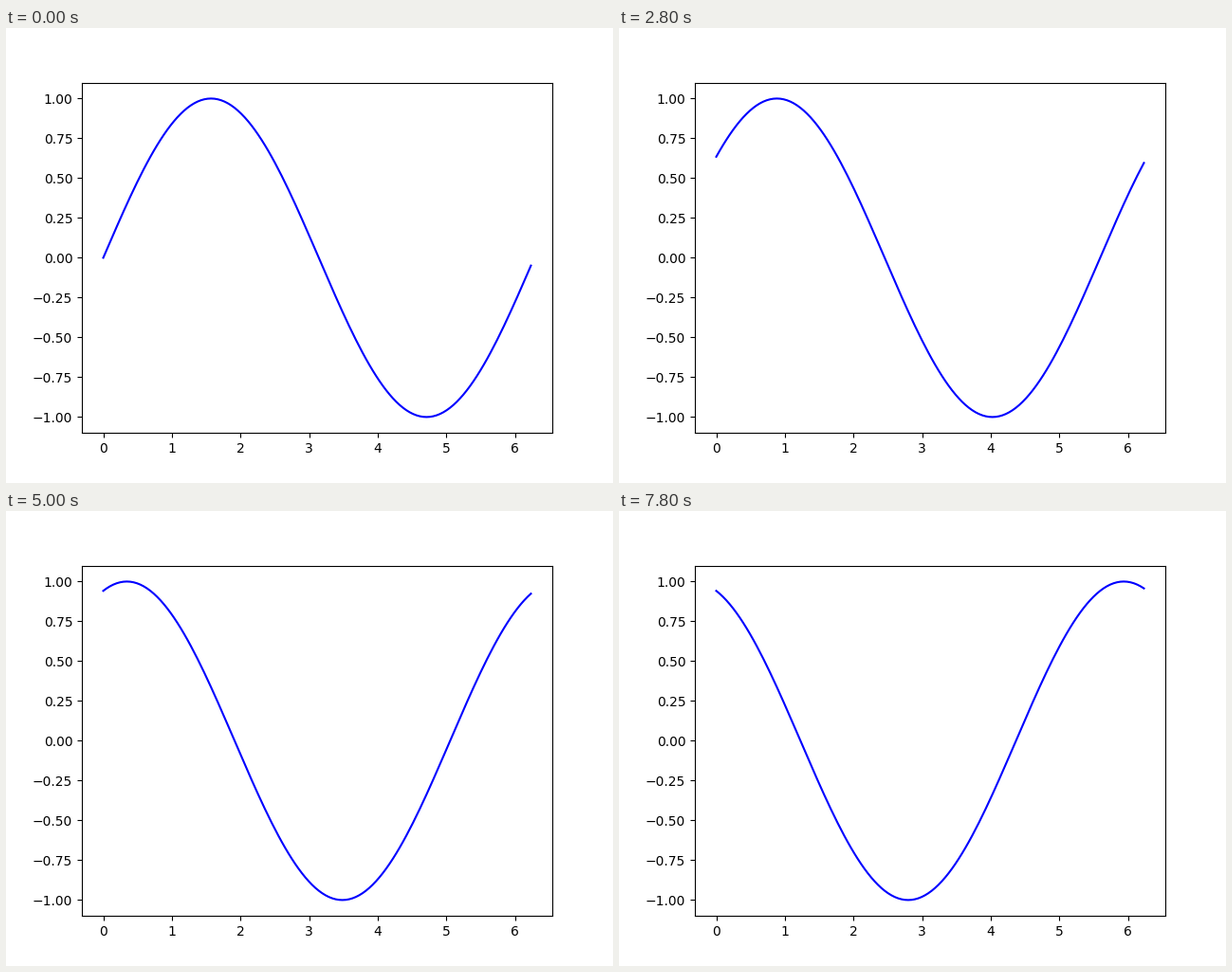
Recreate the animation shown at these times as a matplotlib script. Size 640 by 480 pixels, loop 8000 ms.

```python
import numpy as np
import matplotlib.pyplot as plt
from matplotlib.animation import FuncAnimation

POINTS = 128
FRAMES = 40
INTERVAL = 200  # ms

step = 2 * np.pi / POINTS
x = np.arange(POINTS) * step

fig, ax = plt.subplots(figsize=(6.4, 4.8), dpi=100)
line, = ax.plot(x, np.sin(x), color="blue", linewidth=1.5)


def update(i):
    """Shift the wave left by one sample per frame."""
    line.set_ydata(np.sin(x + i * step))
    return line,


def init():
    return update(0)


anim = FuncAnimation(fig, update, frames=FRAMES, init_func=init,
                     interval=INTERVAL, repeat=True, repeat_delay=0)

plt.show()
```
